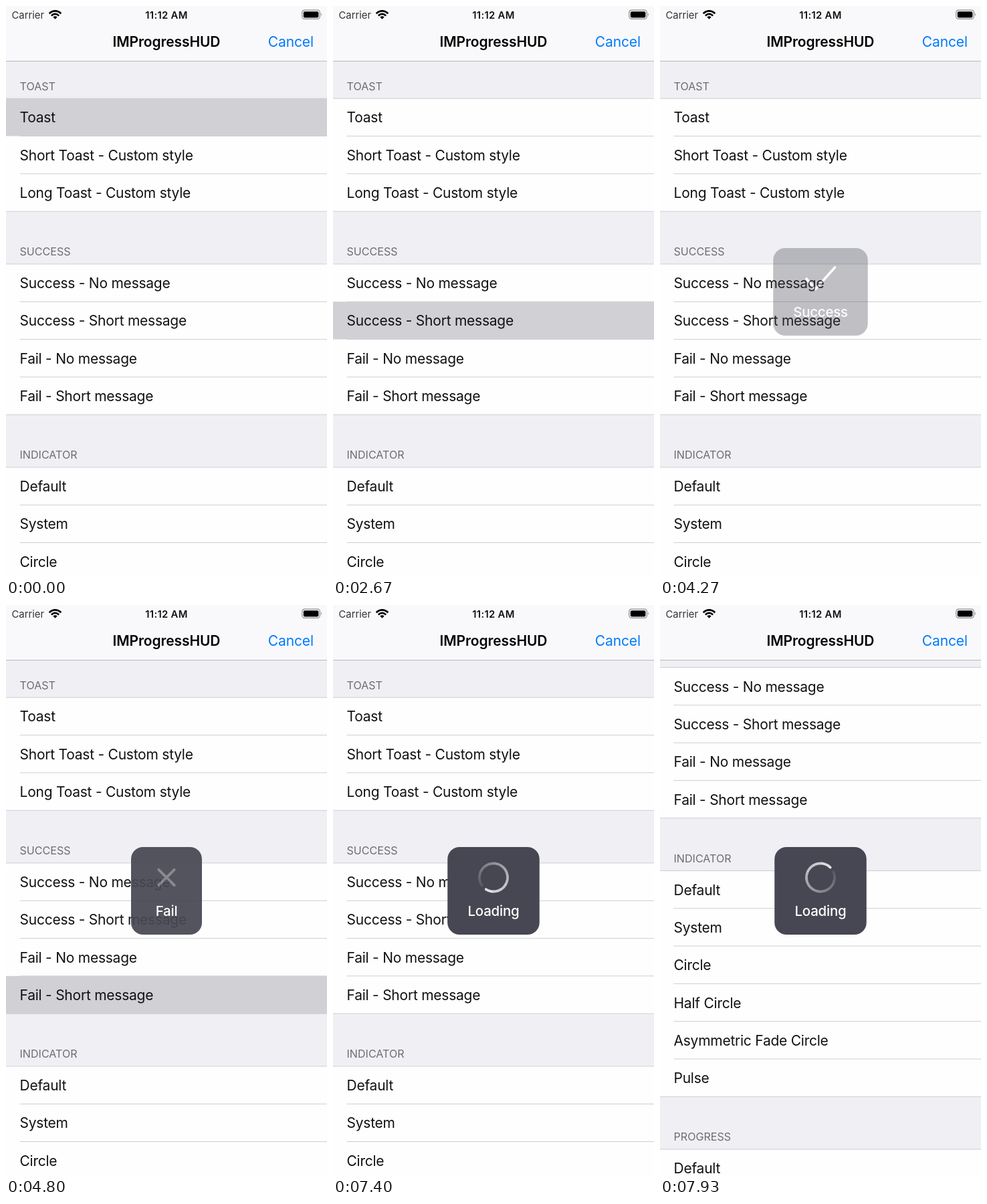
Recreate the animation shown at these times as an HTML page. Size 480 by 854 pixels, loop 8 s.

```html
<!DOCTYPE html>
<html lang="en">
<head>
<meta charset="utf-8">
<title>IMProgressHUD</title>
<style>
  html, body { margin: 0; width: 100%; height: 100%; overflow: hidden; background: #efeff4; }
  svg { display: block; width: 100vw; height: 100vh; }
  text { font: 21px Inter, "Open Sans", sans-serif; letter-spacing: -.24px; fill: #111; }
  .header { font-size: 16.1px; letter-spacing: 0; fill: #6d6d72; }
  .status { font-size: 14.85px; letter-spacing: 0; fill: #333; }
  .clock { font-weight: 600; letter-spacing: .3px; fill: #111; }
  .title { font-weight: 600; letter-spacing: -.1px; fill: #000; }
  .cancel { letter-spacing: -.1px; fill: #007aff; }
  .hud text { font-size: 20.5px; font-weight: 500; fill: #fff; }
  .icon { fill: none; stroke: #fff; stroke-linecap: round; stroke-linejoin: round; }
</style>
</head>
<body>
<svg viewBox="0 0 480 854">
  <g id="list"></g>
  <rect width="480" height="82" fill="#f9f9fb"/>
  <rect y="82" width="480" height="1" fill="#b8b8bc"/>
  <text class="status" x="8.5" y="18.6">Carrier</text>
  <g fill="none" stroke="#000" stroke-width="2.6">
    <path d="M64.6 11.2Q73.5 3.6 82.4 11.2M67.8 14.4Q73.5 9.4 79.2 14.4"/>
    <path d="M73.5 19.8l-3.2-3.4q3.2-2.4 6.4 0z" fill="#000" stroke="none"/>
  </g>
  <text class="status clock" x="240" y="18.6" text-anchor="middle">11:12 AM</text>
  <rect x="442.8" y="6.2" width="26.6" height="13.2" rx="3.6" fill="none" stroke="#8e8e90" stroke-width="1.2"/>
  <rect x="444.8" y="8.2" width="22.6" height="9.2" rx="2" fill="#000"/>
  <path d="M471 10.6q2.2 2.2 0 4.4z" fill="#8e8e90"/>
  <text class="title" x="240" y="61.4" text-anchor="middle">IMProgressHUD</text>
  <text class="cancel" x="460" y="61.4" text-anchor="end">Cancel</text>
  <g id="huds"></g>
</svg>
<script>
const LOOP = 8000, STEP = 1000 / 15;
const POINT = 1.28, ROW = 44 * POINT, GAP = 61.5 * POINT;
const SCROLL = { start: 7467, end: 7933, distance: 292.5 };

const sections = [
  ['TOAST', 'Toast', 'Short Toast - Custom style', 'Long Toast - Custom style'],
  ['SUCCESS', 'Success - No message', 'Success - Short message', 'Fail - No message', 'Fail - Short message'],
  ['INDICATOR', 'Default', 'System', 'Circle', 'Half Circle', 'Asymmetric Fade Circle', 'Pulse'],
  ['PROGRESS', 'Default', 'System', 'Circle']
];

const list = document.getElementById('list');
const huds = document.getElementById('huds');
const clamp = v => Math.max(0, Math.min(1, v));
const ramp = (t, start, length) => clamp((t - start) / length);

function add(parent, tag, attributes = {}, content = '') {
  const node = document.createElementNS('http://www.w3.org/2000/svg', tag);
  for (const name in attributes) node.setAttribute(name, attributes[name]);
  node.textContent = content;
  return parent.appendChild(node);
}

const line = (x, y) => add(list, 'rect', { x, y: y - .5, width: 480 - x, height: 1, fill: '#cfced3' });

// Builds the table and returns the highlight rectangle of every row.
function buildList() {
  const highlights = [];
  let y = 108 * POINT;
  for (const [header, ...rows] of sections) {
    add(list, 'text', { class: 'header', x: 20.5, y: y - 12.7 }, header);
    add(list, 'rect', { y, width: 480, height: rows.length * ROW, fill: '#fefefe' });
    line(0, y);
    rows.forEach((label, i) => {
      highlights.push(add(list, 'rect', { y, width: 480, height: ROW, fill: '#d0d0d5', opacity: 0 }));
      add(list, 'text', { x: 20.5, y: y + 36.2 }, label);
      y += ROW;
      line(i < rows.length - 1 ? 20.5 : 0, y);
    });
    y += GAP;
  }
  return highlights;
}

function buildHud({ label, width, top = 362, height = 131, path, stroke, ring, panel = 1 }) {
  const group = add(huds, 'g', { class: 'hud', opacity: 0 });
  add(group, 'rect', {
    x: 240 - width / 2, y: top, width, height, rx: 18, fill: '#474753', 'fill-opacity': panel
  });
  add(group, 'text', { x: 240, y: top + height - 28, 'text-anchor': 'middle' }, label);
  const icon = add(group, 'g', { class: 'icon' });
  if (path) add(icon, 'path', { d: path, 'stroke-width': stroke });
  if (ring) buildRing(icon);
  return { group, icon };
}

// A circle of short arcs fading from the tail up to a round head at the top.
function buildRing(parent) {
  const count = 60;
  for (let i = 3; i < count; i++) {
    add(parent, 'circle', {
      r: 21, 'stroke-width': 3.8, 'stroke-linecap': 'butt', pathLength: count,
      'stroke-dasharray': `1.05 ${count - 1.05}`, transform: `rotate(${i * 360 / count - 90})`,
      opacity: .06 + .86 * i / count
    });
  }
  add(parent, 'path', { d: 'M0-22.9a1.9 1.9 0 0 1 0 3.8z', fill: '#fff', stroke: 'none', opacity: .92 });
}

const highlights = buildList();
const events = [
  { tap: 0, hide: 1400, fade: 333, row: 0, label: 'IMProgressHUD Toast.', width: 278, top: 392, height: 70.5 },
  { tap: 2667, hide: 4133, fade: 200, row: 4, label: 'Success', width: 141.5,
    path: 'M219 408l13.5 15.5L261.5 391', stroke: 3.6 },
  { tap: 4667, hide: 6195, fade: 138, row: 6, label: 'Fail', width: 106, panel: .93,
    path: 'M228.3 395.8l23.4 23.4M251.7 395.8l-23.4 23.4', stroke: 3.8 },
  { tap: 6667, hide: LOOP, fade: 1, row: 7, label: 'Loading', width: 137.5, ring: true }
].map(event => ({ ...event, ...buildHud(event) }));

function render(t) {
  const p = ramp(t, SCROLL.start, SCROLL.end - SCROLL.start);
  const offset = SCROLL.distance * p * p * (3 - 2 * p);
  list.setAttribute('transform', `translate(0 ${-offset})`);

  for (const { tap, hide, fade, row, group, icon, ring } of events) {
    const pressed = t >= tap - 1 ? 1 - ramp(t, tap + 150, 400) : 0;
    highlights[row].setAttribute('opacity', pressed);
    group.setAttribute('opacity', ramp(t, tap, 133) * (1 - ramp(t, hide, fade)));
    if (ring) {
      icon.setAttribute('transform', `translate(240 407.5) rotate(${212 + (t - 7400) * .36})`);
    } else {
      icon.setAttribute('opacity', ramp(t, tap + 50, 260));
    }
  }
}

const origin = performance.now();
function tick() {
  const t = (performance.now() - origin) % LOOP;
  render(Math.floor((t + 4) / STEP) * STEP % LOOP);
  requestAnimationFrame(tick);
}
tick();
</script>
</body>
</html>
```
